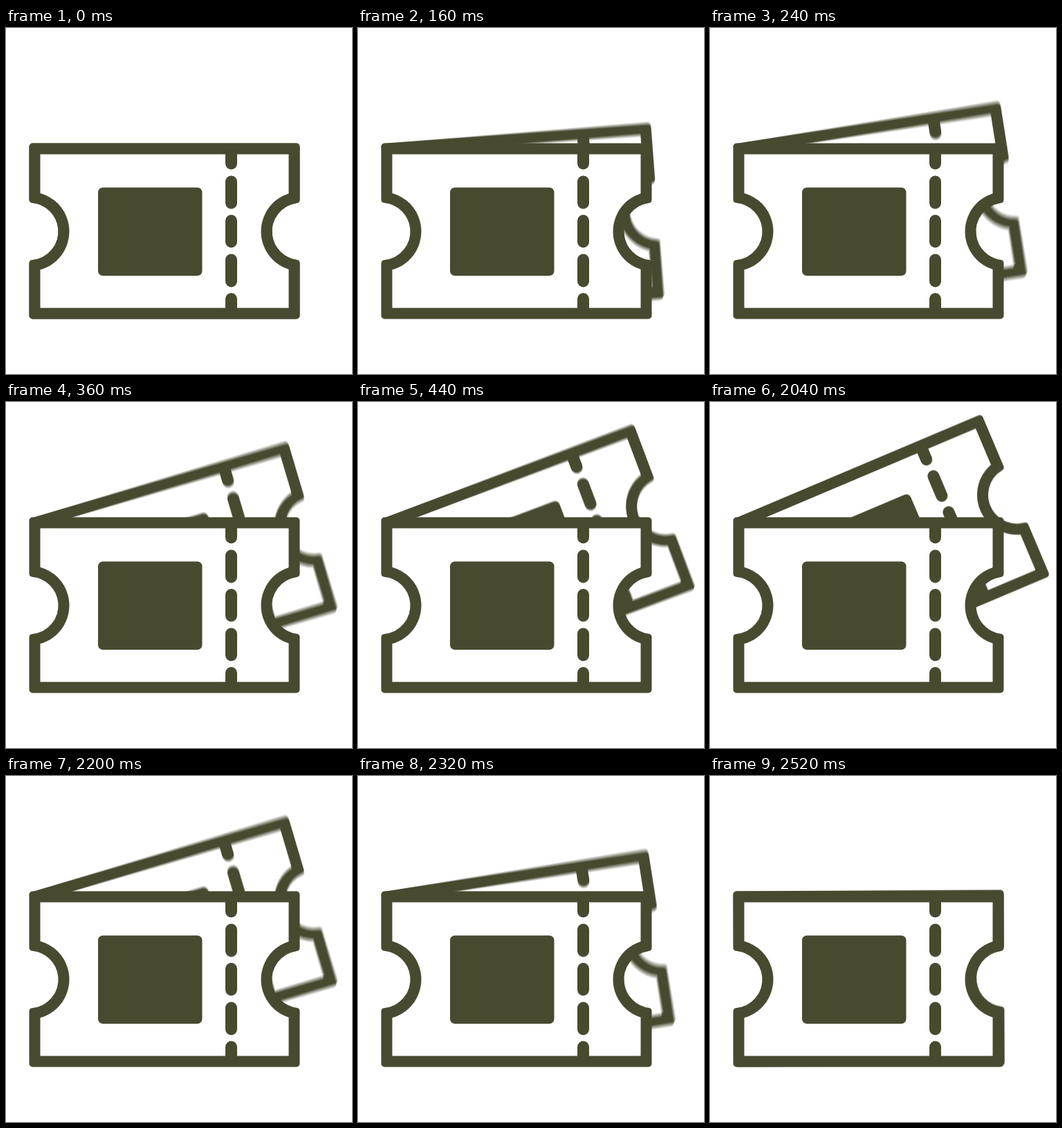
An HTML page with a canvas that plays this animation: 500 px wide and 500 px high, repeating every 2560 ms.

```html
<!DOCTYPE html>
<html lang="en">
<head>
<meta charset="utf-8">
<title>Tickets</title>
<style>
  html, body { margin: 0; width: 100%; height: 100%; overflow: hidden; background: #fff; }
  canvas { display: block; width: 500px; height: 500px; }
</style>
</head>
<body>
<canvas id="stage"></canvas>
<script>
const SIZE = 500, LOOP = 2560, STEP = 40, SWING = 565;
const MAX_ANGLE = 23.3 * Math.PI / 180;
const SHUTTER = 20, SAMPLES = 10;
const INK = '#484a30', PAPER = '#fff';
const PIVOT = { x: 41, y: 171 };
const BOX = { left: 33.5, top: 166.5, right: 424.5, bottom: 420.5 };
const NOTCH = { left: 34, right: 426, y: 294, r: 41.5 };
const BORDER = 16, CORNER = 5;

const scale = window.devicePixelRatio || 1;
const stage = prepare(document.getElementById('stage'));
const layer = prepare(document.createElement('canvas'));

function prepare(canvas) {
  canvas.width = canvas.height = SIZE * scale;
  const ctx = canvas.getContext('2d');
  ctx.scale(scale, scale);
  return ctx;
}

// Ticket outline moved inwards by d, with a round bite on both sides.
function outline(d) {
  const path = new Path2D();
  const left = BOX.left + d, right = BOX.right - d;
  const top = BOX.top + d, bottom = BOX.bottom - d;
  const r = NOTCH.r + d;
  const a = Math.acos((left - NOTCH.left) / r);
  const b = Math.acos((NOTCH.right - right) / r);
  path.moveTo(left, top);
  path.lineTo(right, top);
  path.arc(NOTCH.right, NOTCH.y, r, Math.PI + b, Math.PI - b, true);
  path.lineTo(right, bottom);
  path.lineTo(left, bottom);
  path.arc(NOTCH.left, NOTCH.y, r, a, -a, true);
  path.closePath();
  return path;
}

const body = outline(CORNER);
const inside = outline(BORDER);
const block = new Path2D();
block.roundRect(133, 230.5, 150.5, 127.5, 7);
const dashes = new Path2D();
for (const [from, to] of [[178, 196], [222, 253], [278.5, 309], [335, 366], [391.5, 409]]) {
  dashes.moveTo(325.5, from);
  dashes.lineTo(325.5, to);
}

function drawTicket(ctx) {
  ctx.fillStyle = ctx.strokeStyle = INK;
  ctx.lineJoin = ctx.lineCap = 'round';
  ctx.lineWidth = 2 * CORNER;
  ctx.fill(body);
  ctx.stroke(body);
  ctx.fillStyle = PAPER;
  ctx.fill(inside);
  ctx.fillStyle = INK;
  ctx.fill(block);
  ctx.lineWidth = 17;
  ctx.stroke(dashes);
}

// The way back mirrors the way out.
function angleAt(t) {
  const p = Math.max(0, Math.min(t, LOOP - t, SWING)) / SWING;
  return MAX_ANGLE * (1 - Math.cos(Math.PI * p)) / 2;
}

function drawTurned(ctx, angle) {
  ctx.fillStyle = PAPER;
  ctx.fillRect(0, 0, SIZE, SIZE);
  ctx.save();
  ctx.translate(PIVOT.x, PIVOT.y);
  ctx.rotate(-angle);
  ctx.translate(-PIVOT.x, -PIVOT.y);
  drawTicket(ctx);
  ctx.restore();
}

function draw(t) {
  // Motion blur: running average of poses across the open shutter.
  for (let i = 0; i < SAMPLES; i++) {
    const offset = ((i + 0.5) / SAMPLES - 0.5) * SHUTTER;
    drawTurned(layer, angleAt(t + offset));
    stage.globalAlpha = 1 / (i + 1);
    stage.drawImage(layer.canvas, 0, 0, SIZE, SIZE);
  }
  stage.globalAlpha = 1;
  drawTicket(stage);
}

const start = performance.now();
let shown = -1;
function tick() {
  const elapsed = Math.max(0, performance.now() - start) % LOOP;
  const t = Math.floor(elapsed / STEP) * STEP;
  if (t !== shown) draw(shown = t);
  requestAnimationFrame(tick);
}
tick();
</script>
</body>
</html>
```
